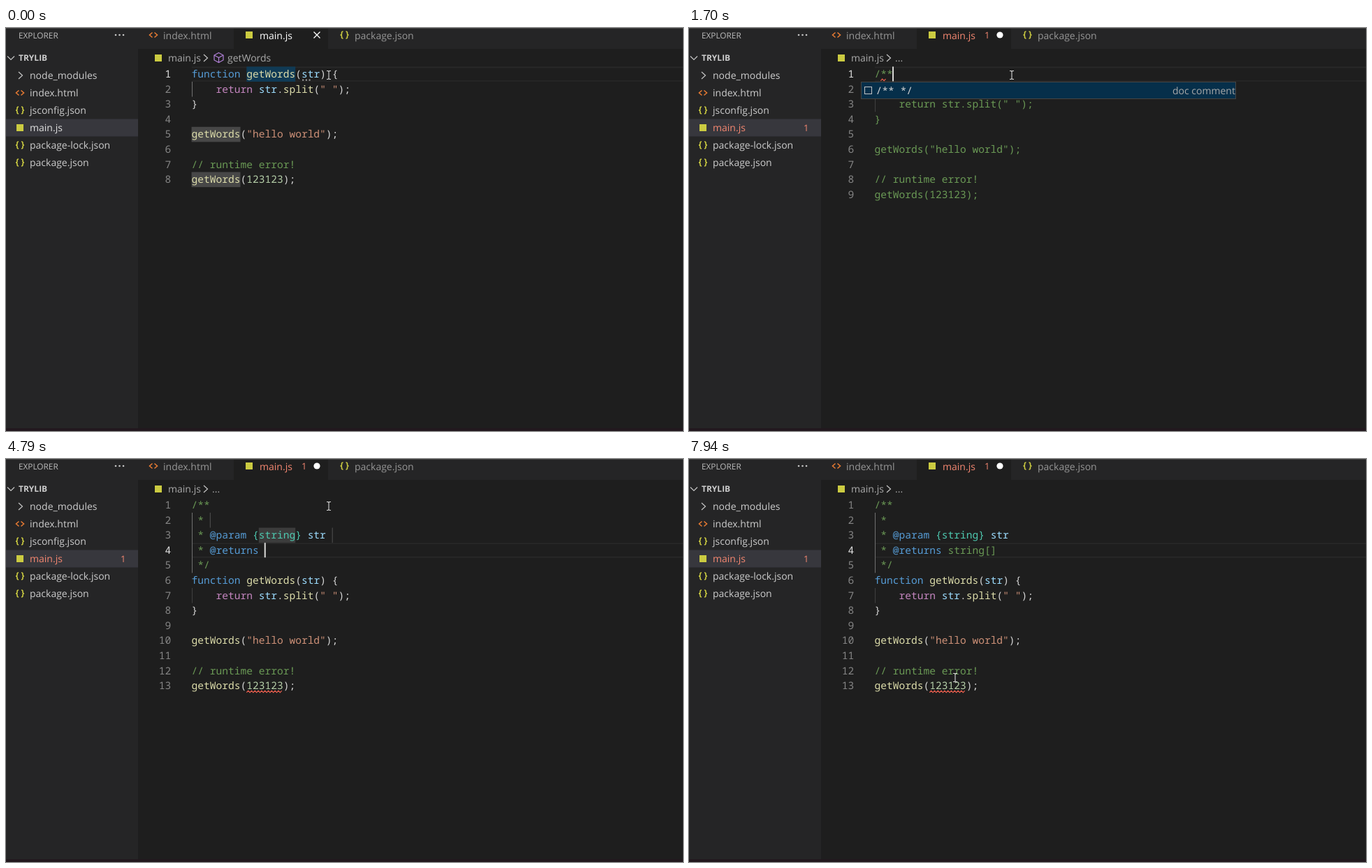
An HTML page for the animation above (8 s loop, 969 by 578 pixels).

```html
<!DOCTYPE html>
<html lang="en">
<head>
<meta charset="utf-8">
<title>Editor</title>
<style>
  html, body { margin: 0; width: 100%; height: 100%; overflow: hidden; background: #1e1e1e; }
  svg { display: block; width: 100vw; height: 100vh; }
  text { white-space: pre; text-rendering: geometricPrecision; }
  .ui { font: 14px "Open Sans", "Noto Sans", sans-serif; }
  .code { font: 500 14.57px "Noto Sans Mono", "DejaVu Sans Mono", monospace; }
</style>
</head>
<body>
<svg id="stage" viewBox="0 0 969 578" preserveAspectRatio="none">
  <g id="chrome"></g>
  <g id="live"></g>
</svg>
<script>
const LOOP = 8000;
const X0 = 265.6, PITCH = 8.742, TOP = 55.4, ROW = 21.6;
const C = {
  keyword: '#569cd6', call: '#dcdcaa', name: '#9cdcfe', flow: '#c586c0',
  string: '#ce9178', number: '#b5cea8', comment: '#6a9955', type: '#4ec9b0',
  plain: '#d4d4d4', error: '#f48771', yellow: '#cbcb41', orange: '#e37933'
};

const colX = c => X0 + c * PITCH;
const rowY = r => TOP + r * ROW;
const esc = s => s.replace(/&/g, '&amp;').replace(/</g, '&lt;').replace(/>/g, '&gt;');

const rect = (x, y, w, h, fill, extra = '') =>
  `<rect x="${x}" y="${y}" width="${w}" height="${h}" fill="${fill}" ${extra}/>`;
const line = (d, stroke, w = 1) =>
  `<path d="${d}" fill="none" stroke="${stroke}" stroke-width="${w}"/>`;
const label = (x, y, s, fill, style = '') =>
  `<text class="ui" x="${x}" y="${y}" fill="${fill}" style="${style}">${esc(s)}</text>`;
const code = (x, y, parts, anchor = 'start') =>
  `<text class="code" x="${x}" y="${y}" text-anchor="${anchor}">` +
  parts.map(([fill, s]) => `<tspan fill="${fill}">${esc(s)}</tspan>`).join('') + '</text>';

// Value of the last [time, value] pair that has begun
const at = (t, steps) => {
  let value = steps[0][1];
  for (const [time, v] of steps) if (t >= time) value = v;
  return value;
};

// Icons, centred on x, y
const icons = {
  html: (x, y) => line(`M${x - 1.5} ${y - 3.5}l-4 3.5l4 3.5M${x + 1.5} ${y - 3.5}l4 3.5l-4 3.5`, C.orange, 1.6),
  json: (x, y) => {
    const brace = s => `M${x + s * 2} ${y - 5}q${s * 2} 0 ${s * 2} 2v1q0 2 ${s * 2} 2q${-s * 2} 0 ${-s * 2} 2v1q0 2 ${-s * 2} 2`;
    return line(brace(-1) + brace(1), C.yellow, 1.6);
  },
  script: (x, y) => rect(x - 5, y - 5, 10, 10, C.yellow)
};
const chevron = (x, y) => line(`M${x - 3} ${y - 5}l5.5 5l-5.5 5`, '#c5c5c5', 1.2);
const cube = (x, y) => line(
  `M${x} ${y - 7}l6.5 3.5v7l-6.5 3.5l-6.5 -3.5v-7zM${x - 6.5} ${y - 3.5}l6.5 3.5l6.5 -3.5M${x} ${y}v7`, '#b180d7', 1.2);

const files = [['html', 'index.html', 93], ['json', 'jsconfig.json', 118], ['json', 'package-lock.json', 168], ['json', 'package.json', 193]];

function chrome() {
  let s = rect(0, 0, 969, 578, '#1e1e1e') + rect(0, 0, 189, 578, '#252526') +
    rect(189, 0, 780, 30, '#252526') + rect(326, 0, 135, 30, '#1e1e1e') +
    rect(0, 130.5, 189, 25, '#37373d') +
    rect(0, 0, 969, 1, '#414141') + rect(0, 574, 969, 4, '#22181e');
  s += label(18, 15, 'EXPLORER', '#bbbbbb', 'font-size:11.8px');
  for (const x of [157, 162.5, 168]) s += `<circle cx="${x}" cy="10" r="1.3" fill="#c5c5c5"/>`;
  s += line('M2 40.5l5 5l5 -5', '#c5c5c5', 1.2) + label(18, 47.3, 'TRYLIB', '#cccccc', 'font-size:12px;font-weight:700');
  s += chevron(21, 68) + label(34, 73, 'node_modules', '#cccccc');
  for (const [icon, name, y] of files) s += icons[icon](20, y) + label(34, y + 5, name, '#cccccc');
  s += icons.script(20, 143) + icons.script(348, 10) + icons.script(218, 43);
  s += icons.html(211, 10) + label(225, 15.7, 'index.html', '#969696');
  s += icons.json(484.5, 10) + label(499, 15.7, 'package.json', '#969696');
  s += label(232, 48, 'main.js', '#a9a9a9') + chevron(286, 43);
  return s;
}

const rules = [
  [/^\/\/.*/, 'comment'], [/^function\b/, 'keyword'], [/^return\b/, 'flow'],
  [/^(getWords|split)\b/, 'call'], [/^"[^"]*"/, 'string'], [/^\d+/, 'number'],
  [/^str\b/, 'name'], [/^./, 'plain']
];
function highlight(src) {
  const parts = [];
  while (src) {
    const [re, kind] = rules.find(([r]) => r.test(src));
    const word = src.match(re)[0];
    parts.push([C[kind], word]);
    src = src.slice(word.length);
  }
  return parts;
}

const body = ['function getWords(str) {', '    return str.split(" ");', '}', '',
  'getWords("hello world");', '', '// runtime error!', 'getWords(123123);'];

function squiggle(row, col, len) {
  const y = rowY(row) + 17.8, end = colX(col + len);
  let x = colX(col), up = false, d = `M${x} ${y + 2.5}`;
  while ((x += 2.4) <= end) d += `L${x} ${(up = !up) ? y : y + 2.5}`;
  return line(d, '#f0604f', 1.2);
}
const cells = (row, col, len, fill, extra) => rect(colX(col), rowY(row), len * PITCH, ROW, fill, extra);
const guide = (row, rows, stroke) => line(`M266.5 ${rowY(row)}v${rows * ROW}`, stroke);

function popup() {
  return rect(246.5, 77.5, 536, 24, '#252526', 'stroke="#454545"') + rect(247, 78, 535, 23, '#062f4a') +
    rect(251.5, 84.5, 10, 10, 'none', 'stroke="#c5c5c5"') +
    code(X0 + 2, 94.5, [['#d4d4d4', '/** */']]) + label(692, 94.5, 'doc comment', '#a9a9a9');
}

function draw(t) {
  const doc = t >= 1950, open = t >= 1580 && !doc, snippet = doc && t < 6320;
  const error = (t >= 1700 && t < 2450) || t >= 4670;
  const type = at(t, [[0, '*'], [3360, 's'], [3610, 'st'], [3740, 'stri'], [4040, 'string']]);
  const ret = at(t, [[0, ''], [5330, 's'], [5580, 'str'], [5700, 'stri'], [5830, 'strin'], [5950, 'string'], [6200, 'string[]']]);
  const head = at(t, [[0, ''], [1170, '/'], [1580, '/*'], [1700, '/**']]);

  let lines;
  if (doc) {
    const g = C.comment;
    lines = [[[g, '/**']], [[g, ' * ']],
      [[g, ' * '], [C.keyword, '@param '], [C.type, `{${type}}`], [C.name, ' str']],
      [[g, ' * '], [C.keyword, '@returns '], [g, ret]], [[g, ' */']]];
  } else {
    lines = t < 520 ? [] : [[[open ? C.comment : C.plain, head]]];
  }
  const first = lines.length;
  lines = lines.concat(body.map(s => open ? [[C.comment, s]] : highlight(s)));

  const [row, col] = at(t, [[0, [0, 0]], [520, [1, 0]], [640, [0, 0]], [1170, [0, head.length]],
    [1950, [2, 11 + type.length]], [4540, [3, 12 + ret.length]], [6200, [3, 19]], [6320, [3, 20]]]);
  const caretOn = at(t, [[0, 0], [370, 1], [2840, 0], [3360, 1], [5170, 0], [5330, 1], [6690, 0], [7210, 1], [7700, 0]]);
  const selecting = doc && t < 3360;

  let s = '';
  // Tab, file row and breadcrumb
  const nameFill = error ? C.error : null;
  s += label(363, 15.7, 'main.js', nameFill || '#ffffff') + label(34, 148, 'main.js', nameFill || '#e0e0e0');
  if (error) s += label(423, 15.2, '1', C.error, 'font-size:13px') + label(164, 148, '1', C.error, 'font-size:13px');
  s += t < 520 ? line('M440.5 5.5l9 9m0 -9l-9 9', '#ffffff', 1.3) : '<circle cx="445" cy="10" r="4.6" fill="#fff"/>';
  s += t < 760 ? cube(304.5, 42.5) + label(317, 48, 'getWords', '#a9a9a9') : label(295, 48, '...', '#a9a9a9');

  // Backgrounds
  if (!selecting) s += line(`M266 ${rowY(row) + 1}H969M266 ${rowY(row) + ROW - 1}H969`, '#292929', 1.6);
  if (t < 520) {
    s += cells(0, 9, 8, '#103a55') + cells(4, 0, 8, '#474747') + cells(7, 0, 8, '#474747');
  }
  if (selecting) {
    s += cells(0, 1, 2, '#3b3f43');
    for (let r = 1; r < 5; r++) s += cells(r, 1, 1, '#3b3f43');
    s += cells(2, 11, 1, '#2f566f');
  } else if (snippet) {
    s += cells(2, 11, type.length, 'rgba(124,124,124,.32)');
    if (t < 4540) for (const c of [10, 11 + type.length]) s += cells(2, c, 1, 'rgba(0,100,0,.1)', 'stroke="#888"');
  }
  if (doc) s += guide(1, 4, '#707070');
  s += guide(first + 1, 1, t < 520 ? '#707070' : '#404040');
  if (snippet) {
    for (const [r, c] of [[1, 3], [2, 15 + type.length + 2], [3, 12]])
      s += line(`M${colX(c) + .5} ${rowY(r)}v${ROW}`, '#525252');
  }

  // Text
  lines.forEach((parts, r) => {
    const y = rowY(r) + 15.6;
    s += code(236.3, y, [[r === row ? '#e0e0e0' : '#858585', String(r + 1)]], 'end') + code(X0, y, parts);
  });

  // Marks
  if (t < 2450) {
    for (let i = 0; i < 3; i++) s += rect(colX(18) + 1.2 + i * 4.7, rowY(first) + 18.2, 2, 2, '#a8a8a8');
  }
  if (t >= 1580 && t < 2450) s += squiggle(0, 1, 1);
  if (t >= 4670) s += squiggle(12, 9, 6);
  if (caretOn) s += rect(colX(col) - .8, rowY(row), 2, ROW - .6, '#d8d8d6');
  if (t >= 1700 && t < 1950) s += popup();

  // Pointer
  const k = Math.max(0, Math.min(1, Math.floor((t - 7210) / 121) / 6));
  const p = k * k * (3 - 2 * k);
  const mx = 462 - 81 * p, my = 67.5 + 246 * p;
  s += line(`M${mx - 3} ${my - 6}h2l1 1l1 -1h2M${mx} ${my - 5}v10M${mx - 3} ${my + 6}h2l1 -1l1 1h2`, '#d8d8d8', 1.1);
  return s;
}

document.getElementById('chrome').innerHTML = chrome();
const live = document.getElementById('live');
let shown = '';
function tick() {
  const next = draw(performance.now() % LOOP);
  if (next !== shown) live.innerHTML = shown = next;
  requestAnimationFrame(tick);
}
tick();
</script>
</body>
</html>
```
